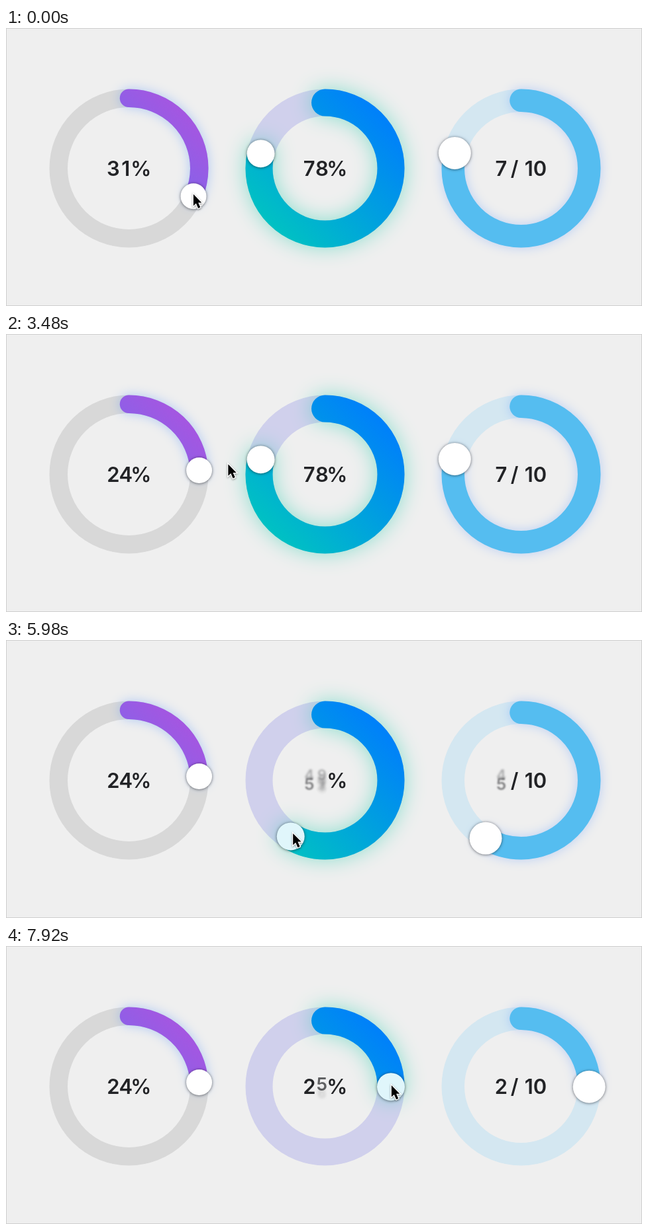
Write an HTML page with a canvas that moves like this. It is 960 px wide and 421 px high and loops after 7940 ms.

```html
<!DOCTYPE html>
<html lang="en">
<head>
<meta charset="utf-8">
<title>Circular sliders</title>
<style>
  html, body { margin: 0; width: 100%; height: 100%; overflow: hidden; background: #efefef; }
  canvas { display: block; width: 960px; height: 421px; }
</style>
</head>
<body>
<canvas id="stage"></canvas>
<script>
const LOOP = 7940, W = 960, H = 421, CY = 212.5;
const ROLL = 300, ROLL_DIST = 14, BASELINE = 224;
const INK = '#222326', FONT = '600 31px Inter, "Open Sans", sans-serif';
const FIRST_DRAG = [120, 3180], SECOND_DRAG = [4160, LOOP];

const canvas = document.getElementById('stage');
const ctx = canvas.getContext('2d');
const dpr = window.devicePixelRatio || 1;
canvas.width = Math.round(W * dpr);
canvas.height = Math.round(H * dpr);

const clamp = x => Math.max(0, Math.min(1, x));
const ease = x => { x = clamp(x); return x * x * (3 - 2 * x); };
const mix = (a, b, u) => a + (b - a) * u;

// Smooth curve through [time, value] keys that never overshoots.
function track(...keys) {
  const n = keys.length;
  const slope = i => (keys[i + 1][1] - keys[i][1]) / (keys[i + 1][0] - keys[i][0]);
  const m = keys.map((k, i) => {
    if (i === 0 || i === n - 1) return 0;
    const a = slope(i - 1), b = slope(i);
    return a * b > 0 ? 2 * a * b / (a + b) : 0;
  });
  return t => {
    if (t <= keys[0][0]) return keys[0][1];
    if (t >= keys[n - 1][0]) return keys[n - 1][1];
    let i = 0;
    while (t >= keys[i + 1][0]) i++;
    const [t0, a] = keys[i], [t1, b] = keys[i + 1];
    const d = t1 - t0, u = (t - t0) / d, v = 1 - u;
    return a * (1 + 2 * u) * v * v + m[i] * d * u * v * v
      + b * u * u * (3 - 2 * u) - m[i + 1] * d * u * u * v;
  };
}

const percentA = track([120, 31.5], [1180, 48.9], [1620, 62], [2240, 49], [3100, 24.1]);
const percentB = track([4160, 78.6], [5380, 51.6], [5760, 49.5], [6280, 74],
  [6480, 74.6], [7340, 31], [7920, 25.1]);

// Lifetimes of every figure a digit place shows during one loop.
function lives(value, divisor) {
  const digit = t => Math.floor(value(t) / divisor) % 10;
  const list = [{ d: digit(0), born: -ROLL, died: Infinity, inDir: 1, outDir: 1 }];
  for (let t = 10; t < LOOP; t += 10) {
    const last = list[list.length - 1], d = digit(t);
    if (d === last.d) continue;
    const dir = Math.sign(value(t) - value(t - 10));
    last.died = t;
    last.outDir = dir;
    list.push({ d, born: t, died: Infinity, inDir: dir, outDir: dir });
  }
  return list;
}

function gauge(cx, width, knob, value, look) {
  return { cx, width, knob, value, radius: 120 - width / 2, ...look,
    places: look.digits.map(([divisor, dx]) => ({ x: cx + dx, list: lives(value, divisor) })) };
}

const percentText = { digits: [[10, -23.7], [1, -4.7]], label: [['%', 18.3]] };
const gauges = [
  gauge(185.5, 27.5, 19.5, percentA, { ...percentText, track: '#d8d8d8',
    fill: ['#af52de', '#477cfa'], glow: 'rgba(40,120,255,.32)', blur: 17,
    drag: FIRST_DRAG, tint: '#edf1fd' }),
  gauge(481.5, 41, 21, percentB, { ...percentText, track: '#d0d0ec',
    fill: ['#007aff', '#00c7be'], glow: 'rgba(0,199,160,.42)', blur: 32,
    drag: SECOND_DRAG, tint: '#e0f6fb' }),
  gauge(777.5, 34.5, 24.5, percentB, { digits: [[10, -30]], label: [['/', -9.8], ['10', 22]],
    track: '#d4e7f1', fill: ['#55bdf0', '#55bdf0'], glow: 'rgba(60,130,255,.3)', blur: 17,
    drag: SECOND_DRAG, tint: '#fff' })
];

const angleAt = (g, t) => (g.value(t) / 100 - 0.25) * 2 * Math.PI;
function polar(g, angle, r) {
  return [g.cx + r * Math.cos(angle), CY + r * Math.sin(angle)];
}

function shadow(color, blur, dy = 0) {
  ctx.shadowColor = color;
  ctx.shadowBlur = blur * dpr;
  ctx.shadowOffsetY = dy * dpr;
}

function ring(g, from, to) {
  ctx.beginPath();
  ctx.arc(g.cx, CY, g.radius, from, to);
  ctx.stroke();
}

function ramp({ cx, radius: r, fill }) {
  const paint = ctx.createLinearGradient(cx + r, CY - r, cx - r, CY + r);
  fill.forEach((color, i) => paint.addColorStop(i, color));
  return paint;
}

function drawDigits(place, t) {
  for (const f of place.list) {
    if (t < f.born || t > f.died + ROLL) continue;
    const come = ease((t - f.born) / ROLL), go = ease((t - f.died) / ROLL);
    const shown = come * (1 - go), scale = mix(0.5, 1, shown);
    if (shown < 0.01) continue;
    const dy = ROLL_DIST * (f.inDir * (1 - come) - f.outDir * go);
    ctx.save();
    ctx.globalAlpha = Math.pow(shown, 1.2);
    if (shown < 0.99) ctx.filter = `blur(${(1 - shown) * 3 * dpr}px)`;
    ctx.translate(place.x, BASELINE - 11 + dy);
    ctx.scale(scale, scale);
    ctx.fillText(f.d, 0, 11);
    ctx.restore();
  }
}

function drawGauge(g, t) {
  const start = -Math.PI / 2, end = angleAt(g, t);
  ctx.lineWidth = g.width;
  ctx.lineCap = 'round';
  ctx.strokeStyle = g.track;
  ring(g, 0, 2 * Math.PI);

  ctx.save();
  shadow(g.glow, g.blur);
  ctx.strokeStyle = ramp(g);
  ring(g, start, end);
  ctx.restore();

  ctx.save();
  shadow('rgba(0,0,0,.55)', 4, 0.5);
  ctx.fillStyle = t >= g.drag[0] && t < g.drag[1] ? g.tint : '#fff';
  ctx.beginPath();
  ctx.arc(...polar(g, end, g.radius), g.knob, 0, 2 * Math.PI);
  ctx.fill();
  ctx.restore();

  ctx.fillStyle = INK;
  ctx.font = FONT;
  ctx.textAlign = 'center';
  for (const p of g.places) drawDigits(p, t);
  for (const [s, dx] of g.label) ctx.fillText(s, g.cx + dx, BASELINE);
}

// The pointer circles with the dragged knob, drifting in and out a little,
// and glides from one gauge to the next between the drags.
function pointerAt(t) {
  const [a, b] = gauges;
  const turnA = clamp(t / FIRST_DRAG[1]);
  const turnB = clamp((t - SECOND_DRAG[0]) / (LOOP - SECOND_DRAG[0]));
  const [ax, ay] = polar(a, angleAt(a, t), 104 - 34 * Math.sin(Math.PI * turnA));
  const [bx, by] = polar(b, angleAt(b, t), 98 - 12 * Math.sin(2 * Math.PI * turnB));
  const u = ease((t - FIRST_DRAG[1]) / 640);
  return [mix(ax, bx, u) + 2, mix(ay, by, u) - 2];
}

const arrow = new Path2D('M0 0V17.5L4 13.8L7.2 21.2L10.4 19.8L7.2 12.6H12.4Z');

function drawPointer(t) {
  ctx.save();
  ctx.translate(...pointerAt(t));
  ctx.lineWidth = 2.6;
  ctx.strokeStyle = '#fff';
  shadow('rgba(0,0,0,.4)', 3, 1);
  ctx.stroke(arrow);
  shadow('transparent', 0);
  ctx.fillStyle = '#000';
  ctx.fill(arrow);
  ctx.restore();
}

function draw(t) {
  ctx.setTransform(dpr, 0, 0, dpr, 0, 0);
  ctx.fillStyle = '#efefef';
  ctx.fillRect(0, 0, W, H);
  ctx.strokeStyle = '#cfcfcf';
  ctx.lineWidth = 1;
  ctx.strokeRect(0.5, 0.5, W - 1, H - 1);
  for (const g of gauges) drawGauge(g, t);
  drawPointer(t);
}

const began = performance.now();
function frame() {
  draw((performance.now() - began) % LOOP);
  requestAnimationFrame(frame);
}
frame();
</script>
</body>
</html>
```
